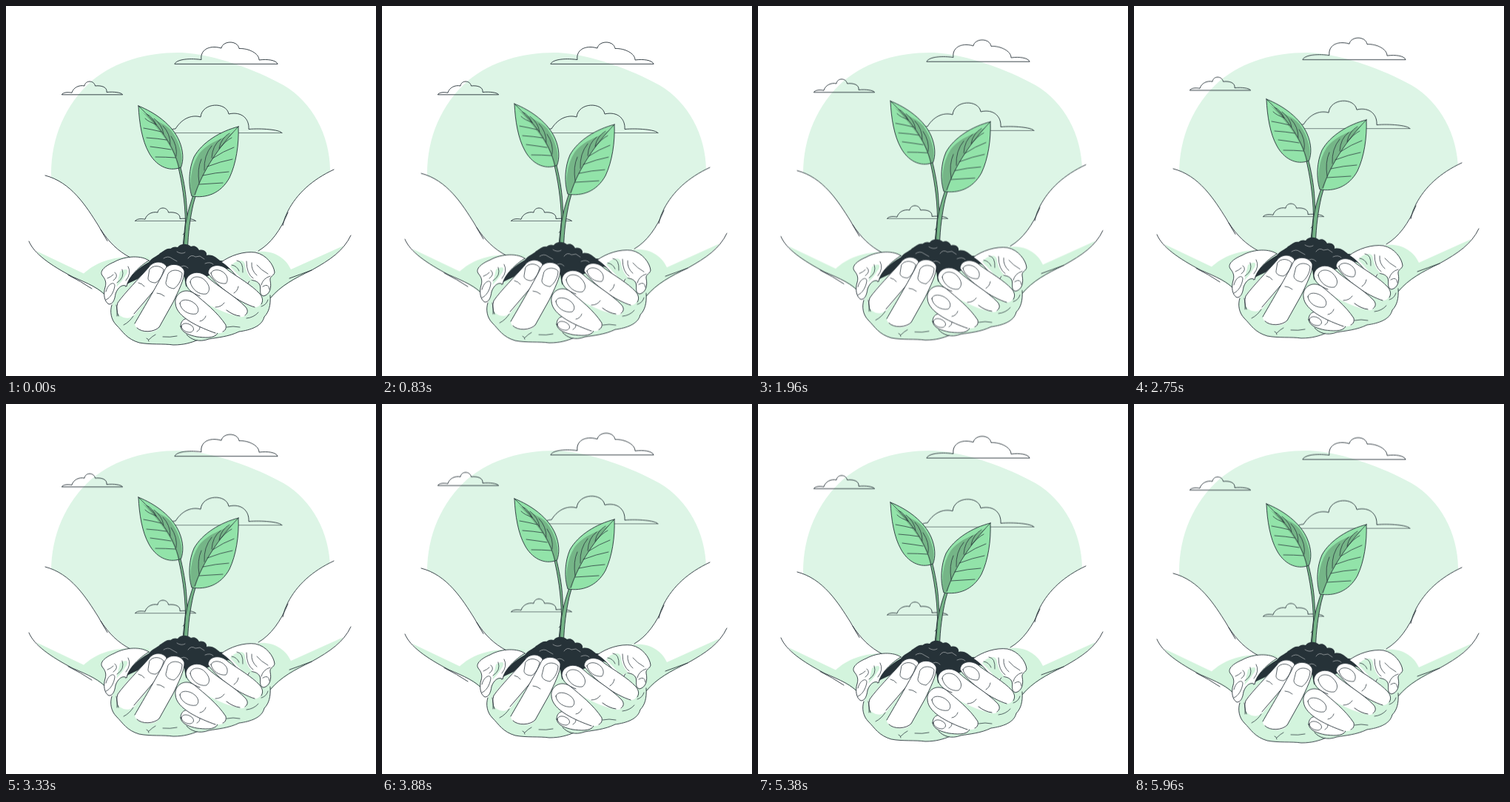
An HTML page that plays this animation: 500x500 px, repeating every 6 s.

```html
<!DOCTYPE html>
<html lang="en">
<head>
<meta charset="utf-8">
<title>Seedling in cupped hands</title>
<style>
  html, body { margin: 0; width: 100%; height: 100%; overflow: hidden; background: #fff; }
  svg { display: block; width: 100vw; height: 100vh; }
  .line { fill: none; stroke: #263238; stroke-width: .9; stroke-linecap: round; stroke-linejoin: round; }
  .thin { stroke-width: .75; }
  .skin { fill: #fff; }
  .shade { fill: #d3f4dd; }
  .leaf { fill: #92e3a9; }
  .dark { fill: #75b587; }
  .soil { fill: #263238; }
  .crumb { fill: none; stroke: #fff; stroke-width: .6; stroke-linecap: round; opacity: .75; }
  .hands { animation: lift 6s linear infinite; }
  .clouds { animation: drift 6s linear infinite; }
  @keyframes lift {
    0%, 100% { transform: translateY(0); }
    50% { transform: translateY(-10px); }
  }
  /* rests one second, rises for three, then is cut off on the way down */
  @keyframes drift {
    0%, 16.667% { transform: translateY(0); }
    66.667% { transform: translateY(-10px); }
    100% { transform: translateY(-3.333px); }
  }
</style>
</head>
<body>
<svg viewBox="0 0 500 500">
  <path fill="#ddf5e6" d="M61 226C61 178 80 133 116 101C150 73 194 62 238 63C283 66 335 85 375 107C414 130 437 174 438 221C437 275 405 330 355 350H145C92 330 61 285 61 226Z"/>

  <g class="clouds line">
    <path d="M228 78C230 73 244 70 264 72.500C262 60 274 52 291 57C293 46.500 313 46 315 57.500C328 57 342 64 342 73C353 71.500 365 73 367 78Z"/>
    <path d="M219 171.500C220 168 224 166 229 166C239 150 253 147 263 150C265 130 298 129 301 146C318 142 329 152 328 166.500C345 165 370 167 373 171.500Z"/>
    <path id="puff" d="M75.500 119.500C77 117 82 116 89 117.200C91 110 99 106.500 106 108C107 100 119 100 120.500 108C130 107 137 110 136 116.500C146 115.500 156 117 157.500 119.500Z"/>
    <use href="#puff" x="99" y="171"/>
  </g>

  <g class="hands">
    <!-- arms -->
    <path class="skin" d="M53 229C88 238 108 270 129 302C139 318 151 330 168 340L205 350L150 411C137 388 112 374 90 366C60 350 38 335 31 318Z"/>
    <path class="skin" d="M443 221C413 235 393 254 381 277C371 303 358 321 341 331L300 350L357 396C372 378 391 368 413 357C438 343 456 331 466 310Z"/>
    <path class="shade" d="M41 331L105 361.500C122 346 145 336 193 339L190 380L150 411C137 388 112 374 90 366C69 355 50 344 41 331Z"/>
    <path class="shade" d="M456 324L385 356C378 341 363 330 340 332L320 365L357 396C372 378 391 368 413 357C432 346 447 336 456 324Z"/>
    <g class="line">
      <path d="M53 229C88 238 108 270 125 297Q131 308 137 317.500M128 302C139 319 151 331 168 340"/>
      <path d="M31 318C38 335 60 350 90 366C111 375 128 382 137 394M84 363.500Q101 372 116 382"/>
      <path d="M443 221C413 235 393 254 381 277Q376 286 374 296.500M381 279C371 303 358 321 341 331"/>
      <path d="M466 310C456 331 438 343 413 357C390 368 371 378 357 395M413 357Q397 363 383 368"/>
    </g>

    <!-- stems -->
    <path class="dark line" d="M232 214C238 239 242 265 242.500 292L238.500 329H244.500C246 306 245 287 244 270C243 249 239 231 235 214Z"/>
    <path class="dark line" d="M255 250C249 266 245 280 242.500 296L240 329H245.500C246 306 249 286 253 268L258 250Z"/>
    <path class="line thin" d="M239 309L242 306"/>

    <!-- leaves -->
    <path class="leaf" d="M179 135C202 144 225 161 234 182C240 196 240 209 236.500 218C219 225 202 215 193 198C184 182 180 158 179 135Z"/>
    <path class="dark" d="M184 143C200 156 213 157 223 168C235 184 240 204 236.500 218L232.500 219C229 198 215 174 184 143Z"/>
    <path class="line" d="M179 135C202 144 225 161 234 182C240 196 240 209 236.500 218C219 225 202 215 193 198C184 182 180 158 179 135Z"/>
    <path class="line thin" d="M179 135C206 161 226 186 234 219M190 146Q199 150 203 161M200 152Q211 160 213 173M212 162Q222 172 222 187M223 176Q232 189 230 203M188 152Q193 157 203 160M186 165Q198 167 210 170M190 178Q205 179 217 181M195 190Q211 192 223 194M202 204Q216 204 229 205"/>

    <path class="leaf" d="M314 163C290 169 265 184 254 204C247 220 246 241 251 257C270 260 290 254 302 232C311 213 315 187 314 163Z"/>
    <path class="dark" d="M308 170C293 180 272 184 260 201C250 217 247 240 251 257L256 256C264 229 282 198 308 170Z"/>
    <path class="line" d="M314 163C290 169 265 184 254 204C247 220 246 241 251 257C270 260 290 254 302 232C311 213 315 187 314 163Z"/>
    <path class="line thin" d="M314 163C288 190 266 222 255 255M302 172Q291 178 288 192M290 180Q279 188 278 205M278 189Q267 202 268 222M264 207Q258 220 261 239M305 178Q297 182 288 193M308 191Q294 196 279 206M306 207Q290 210 272 217M301 224Q283 225 266 229M293 239Q277 240 261 241"/>

    <!-- soil -->
    <path class="soil" d="M161 382C163 367 180 353 193 346C198 339 205 338 208 334C214 331 217 327 222 328C226 325 229 325 232 326C236 320 246 321 250 325C255 323 259 326 261 330C268 328 272 333 271 337C280 335 285 341 289 344C299 344 303 347 307 352L290 395H170Z"/>
    <path class="crumb" d="M213 341Q219 337 224 341L231 345M246 341Q250 335 256 339L262 338 268 342M231 332Q237 336 242 333M269 348Q276 345 280 349M234 354Q240 348 246 354"/>

    <!-- left palm and thumb -->
    <path class="shade" d="M143 404C140 413 142 424 149 431C158 440 163 450 180 455C196 458 212 456 226 458C241 458 250 455 260 451L248 410L241 366L214 352L165 375Z"/>
    <path class="line" d="M143 404C140 413 142 424 149 431C158 440 163 450 180 455C196 458 212 456 226 458C241 458 250 455 260 451"/>
    <path class="skin line" d="M193 344C184 337 162 337 146 346C134 351 126 358 130 364C134 369 136 373 134 380C131 389 133 400 139 403C145 403 147 396 148 389C151 380 158 375 163 379C165 366 181 351 193 344Z"/>
    <path class="shade" d="M154 359C163 353 168 356 161 365Q157 372 149 380Q152 368 154 359Z"/>
    <path class="line thin" d="M135 386C138 374 147 372 147 378C146 386 141 395 135 397M157 356Q161 367 150 374M165 352Q170 361 162 371M147 360Q153 365 145 371M137 368Q142 366 145 363"/>

    <!-- left fingers -->
    <path class="skin" d="M193 353C199 344 212 344 217 352C217 361 211 371 203 381L174 417C164 428 146 418 149 404C156 390 180 368 193 353Z"/>
    <path class="line" d="M152 419Q148 410 151 401C160 388 180 368 193 353C199 344 212 344 217 352C217 361 211 371 203 381L173 416"/>
    <path class="skin" d="M214 358C217 347 236 346 241 358C242 368 232 387 226 400L207 434C200 446 175 440 174 430C182 415 204 378 214 358Z"/>
    <path class="line" d="M174 429C182 415 204 378 214 358C217 347 236 346 241 358C242 368 232 387 226 400L207 434C200 441 184 442 177 435"/>
    <path class="skin line thin" d="M194 356C198 350 208 350 213 356C212 363 207 372 202 374C196 374 191 371 192 367Z"/>
    <path class="skin line thin" d="M219 362C223 355 234 356 238 361C238 369 233 378 227 382C220 381 216 378 216 374Z"/>
    <path class="line thin" d="M179 374Q184 375 187 379M204 388Q209 388 214 392M159 431Q167 427 172 419M193 451Q198 446 202 444M190 449Q193 450 193 453M212 447Q222 448 231 446M149 404Q151 411 150 419"/>

    <!-- right palm and thumb -->
    <path class="shade" d="M357 391C358 405 355 414 349 420C346 433 330 438 315 440C301 447 285 448 274 450C261 455 250 451 244 444L229 416L245 375L300 355L345 375Z"/>
    <path class="line" d="M357 391C358 405 355 414 349 420C346 433 330 438 315 440C301 447 285 448 274 450C261 455 250 451 244 444"/>
    <path class="skin line" d="M291 346C303 337 322 331 337 333C352 336 362 350 363 360C362 365 356 365 357 371C359 380 357 390 348 392C341 390 345 382 343 377C340 371 334 371 330 370L322 382C315 369 305 355 291 346Z"/>
    <path class="shade" d="M314 345Q323 341 324 355Q327 365 333 370L323 374Q309 358 303 352Q309 345 314 345Z"/>
    <path class="line thin" d="M312 344Q321 345 320 360M325 345Q325 362 334 368M305 350Q312 351 315 358M345 377Q347 368 357 365M347 379Q355 374 356 383M339 350Q345 357 354 362M332 347Q331 357 339 364"/>

    <!-- right fingers -->
    <path class="skin" d="M273 361C274 349 290 347 300 357C314 367 332 377 343 389C350 398 344 408 335 407C320 403 287 381 273 361Z"/>
    <path class="line" d="M336 407C316 401 287 381 273 361C274 349 290 347 300 357C314 367 332 377 343 389C348 395 347 400 345 403"/>
    <path class="skin" d="M243 374C243 361 260 355 272 366C286 379 310 392 324 407C330 416 322 423 313 419C290 414 252 396 243 374Z"/>
    <path class="line" d="M298 411Q307 418 316 419M262 392C251 388 244 382 243 374C243 361 260 355 272 366C286 379 310 392 324 407C328 412 326 416 323 418"/>
    <path class="skin line" d="M236 433C236 422 246 419 255 427L286 442C282 450 267 448 258 447C249 445 237 442 236 433Z"/>
    <path class="skin" d="M229 402C227 389 242 379 255 389C268 400 286 414 297 431C300 441 289 444 280 441C263 435 230 421 229 402Z"/>
    <path class="line" d="M283 442C263 435 230 421 229 402C227 389 242 379 255 389C268 400 286 414 297 431C298 436 296 439 293 440"/>
    <path class="skin line thin" d="M277 361C279 355 290 355 296 362C300 366 300 372 297 375C288 376 279 370 277 361Z"/>
    <path class="skin line thin" d="M249 373C250 364 263 364 269 371C276 378 276 385 271 389C261 391 251 383 249 373Z"/>
    <path class="skin line thin" d="M235 402C236 395 248 396 255 402C261 407 261 413 257 416C247 418 236 411 235 402Z"/>
    <path class="skin line thin" d="M237 433C238 427 247 428 252 433C255 437 253 440 249 441C243 441 238 438 237 433Z"/>
    <path class="line thin" d="M308 388Q313 385 314 379M283 407Q291 407 295 401M262 426Q268 425 270 419M258 440Q262 438 262 434M298 434Q307 432 316 434M325 422Q335 421 341 414M345 406Q352 404 354 397"/>
  </g>
</svg>
</body>
</html>
```
